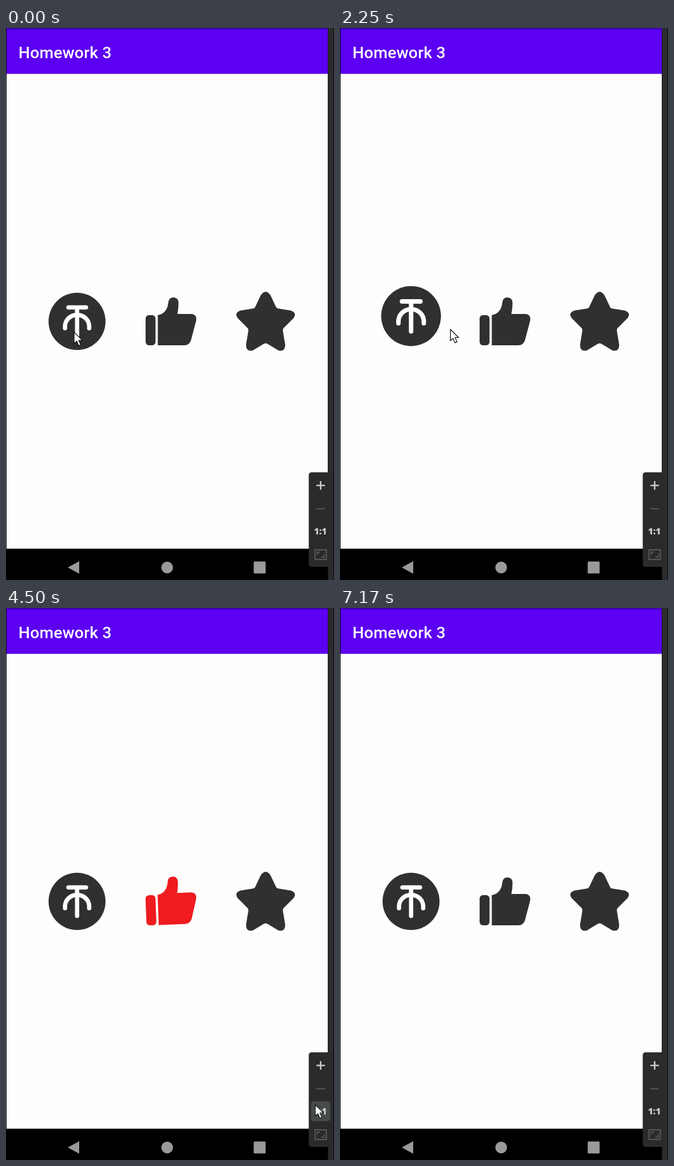
Recreate the animation shown at these times as an HTML page. Size 578 px wide and 969 px high, loop 7760 ms.

```html
<!DOCTYPE html>
<html lang="en">
<head>
<meta charset="utf-8">
<title>Icon buttons</title>
<style>
  html, body { margin: 0; width: 100%; height: 100%; overflow: hidden; background: #000; }
  svg { display: block; width: 100vw; height: 100vh; }
  .title { font: 500 28.5px Roboto, sans-serif; letter-spacing: .2px; fill: #fff; }
  .zoom { font: 800 15.5px "Open Sans", sans-serif; fill: #ccc; text-anchor: middle; }
  .line { fill: none; stroke-linecap: round; stroke-linejoin: round; }
</style>
</head>
<body>
<svg viewBox="0 0 578 969" preserveAspectRatio="none">
  <rect width="578" height="969" fill="#000"/>
  <rect x="1" width="566" height="914" fill="#fdfdfb"/>
  <rect x="1" width="566" height="80.5" fill="#5c00f2"/>
  <rect x="1" width="566" height="2.5" fill="#3d00b4"/>
  <rect x="567.5" width="9.5" height="969" fill="#2c2c2e"/>
  <text class="title" x="22" y="53">Homework 3</text>

  <g fill="#9a9a9a">
    <path d="M109 947 L129 936 V958 Z"/>
    <circle cx="284" cy="947" r="10.3"/>
    <rect x="436.5" y="936.5" width="21" height="21" rx="1.5"/>
  </g>

  <g id="coin">
    <circle cx="125.2" cy="515" r="50.2"/>
    <g class="line" stroke="#fff" stroke-width="7.5">
      <path d="M110 490.5 H141 M125.3 491 V540.5"/>
      <path d="M104 527 V524 A21.3 20.5 0 0 1 146.6 524 V527"/>
    </g>
  </g>

  <g id="thumb">
    <rect x="246" y="504" width="17.5" height="53" rx="6"/>
    <path d="M267.5 504 Q284 501 286 482 Q287 473 295 473 Q304 473 304 483
             Q304 493 302 502 L327 502 Q337 503 335 514 L326 548 Q323 557 314 557 H267.5 Z"/>
  </g>

  <path id="star" d="M449 469 Q457.5 457 466 469 L476 490 Q477 492 480 492.5
    L502 496 Q513 500 507 509 L489 527 Q487.5 529 488 532 L492 556 Q492 569 480 566
    L460 554 Q457.5 553 455 554 L435 566 Q423 569 423 556 L427 532 Q427.5 529 426 527
    L408 509 Q402 500 413 496 L435 492.5 Q438 492 439 490 Z"/>

  <g id="popup">
    <rect x="306" y="465" width="47" height="46.5" rx="5" fill="#fa0000" fill-opacity=".71"/>
    <g class="line" stroke="#fff" stroke-opacity=".85" stroke-width="2.2">
      <circle cx="327.5" cy="486" r="10.5"/>
      <path d="M335.5 494 L342.5 501" stroke-width="3.8"/>
    </g>
  </g>

  <path d="M578 780 H539 Q533.5 780 533.5 785 V941 Q533.5 946 539 946 H572 Q577 946 577 941 V780 Z" fill="#2b2b2b"/>
  <rect id="hover" x="537.5" y="866" width="34" height="35" rx="5" fill="#474b4b"/>
  <path class="line" d="M548 803 H561 M554.5 796.5 V809.5" stroke="#ccc" stroke-width="2.6"/>
  <path class="line" d="M547.5 844 H561.5" stroke="#555" stroke-width="2"/>
  <text class="zoom" x="554" y="889">1:1</text>
  <g class="line" stroke="#5a5a5a" stroke-width="2">
    <rect x="544.5" y="916" width="20" height="17"/>
    <path d="M548.5 924 V920 H552.5 M560.5 925 V929 H556.5"/>
  </g>

  <path id="cursor" d="M0 0 V20 L4.7 15.7 L8 23.5 L11.6 22 L8.3 14.4 H14.5 Z"
    fill="#fff" stroke="#111" stroke-width="1.3" stroke-linejoin="round"/>
</svg>
<script>
const LOOP = 7760, FPS = 12;
const GREY = '#303030', RED = '#ef1b20';
const el = id => document.getElementById(id);
const wave = p => Math.sin(Math.PI * p) ** 2;
const ease = p => (1 - Math.cos(Math.PI * p)) / 2;

// Each icon is tapped twice: on, then off again.
const icons = [
  { node: el('coin'), x: 125, y: 515, taps: [690, 1700], span: 700,
    pose: p => ({ dy: -24 * wave(p), scale: 1 + 0.07 * Math.min(1, p / 0.07, (1 - p) / 0.3) }) },
  { node: el('thumb'), x: 290, y: 515, taps: [2825, 4440], span: 700,
    pose: p => ({ dx: wave(p), dy: -18 * wave(p), turn: -30 * wave(p) }) },
  { node: el('star'), x: 457.5, y: 518, taps: [5425, 6290], span: 670,
    pose: p => ({ dx: 3.5 * wave(p), dy: -24 * wave(p), turn: 360 * ease(p), scale: 1 + 0.02 * wave(p) }) },
];

// Rows of time, then values
const cursorPath = [
  [0, 120, 534], [83, 122, 534], [333, 135, 528], [2083, 135, 528], [2500, 307, 531],
  [3000, 307, 531], [3500, 313, 537], [3833, 315, 539], [4250, 315, 539], [4500, 545, 872],
  [5083, 545, 872], [5417, 464, 528], [6500, 464, 528], [7083, 476, 961],
];
const popupFade = [[2830, 0], [3000, 1], [3420, 1], [3750, 0]];

function sample(rows, t) {
  const i = rows.findIndex(row => row[0] > t);
  if (i === 0) return rows[0].slice(1);
  if (i < 0) return rows[rows.length - 1].slice(1);
  const a = rows[i - 1], b = rows[i];
  const k = ease((t - a[0]) / (b[0] - a[0]));
  return a.slice(1).map((v, j) => v + (b[j + 1] - v) * k);
}

function drawIcon({ node, x, y, taps, span, pose }, t) {
  const [on, off] = taps.map(start => Math.min(1, Math.max(0, (t - start) / span)));
  const p = off > 0 ? off : on;
  const { dx = 0, dy = 0, turn = 0, scale = 1 } = pose(p);
  node.setAttribute('transform',
    `translate(${x + dx} ${y + dy}) rotate(${turn}) scale(${scale}) translate(${-x} ${-y})`);
  node.setAttribute('fill', on > 0.55 && off <= 0.55 ? RED : GREY);
}

function draw(now) {
  const t = Math.floor((now % LOOP + 9) * FPS / 1000) * 1000 / FPS;
  icons.forEach(icon => drawIcon(icon, t));
  const [x, y] = sample(cursorPath, t);
  el('cursor').setAttribute('transform', `translate(${x} ${y})`);
  el('cursor').style.visibility = t > 7100 ? 'hidden' : 'visible';
  el('popup').style.opacity = sample(popupFade, t)[0];
  el('hover').style.visibility = x > 537 && y > 860 ? 'visible' : 'hidden';
}

const start = performance.now();
function tick() {
  draw(performance.now() - start);
  requestAnimationFrame(tick);
}
tick();
</script>
</body>
</html>
```
